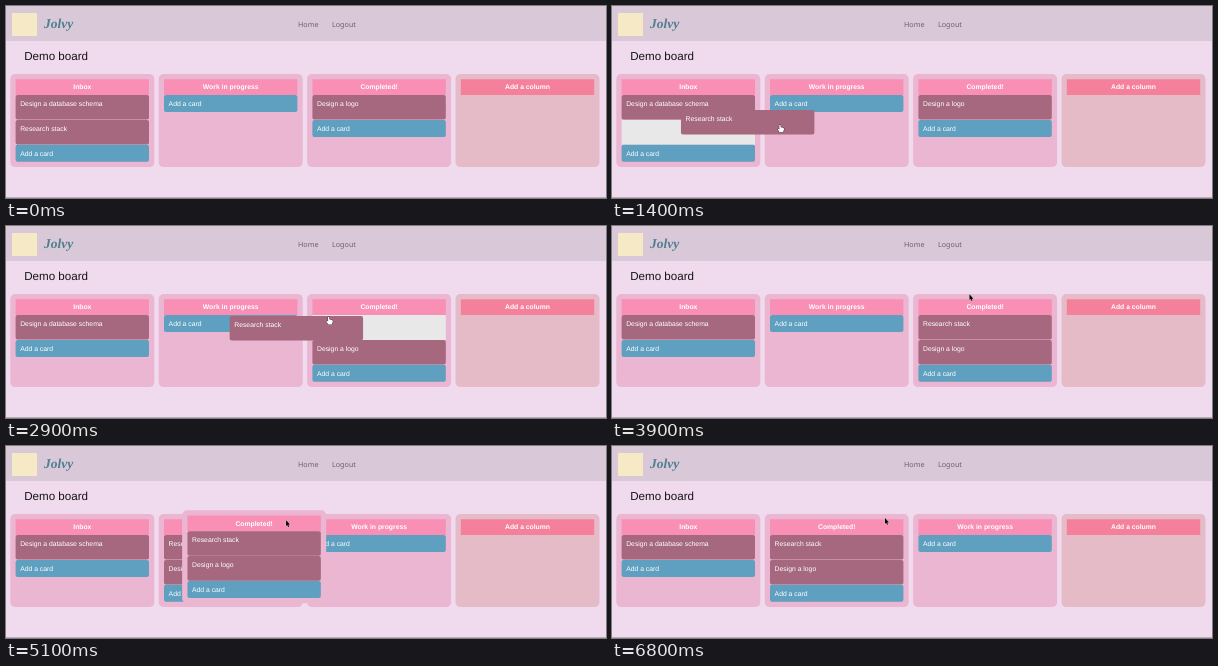
Recreate the animation shown at these times as an HTML page with a canvas. Size 600 by 192 pixels, loop 6.9 s.

```html
<!DOCTYPE html>
<html lang="en">
<head>
<meta charset="utf-8">
<title>Demo board</title>
<style>
  html, body { margin: 0; width: 600px; height: 192px; overflow: hidden; background: #f0daee; }
  canvas { display: block; }
</style>
</head>
<body>
<canvas id="stage" width="600" height="192"></canvas>
<script>
const ctx = document.getElementById('stage').getContext('2d');
ctx.textRendering = 'geometricPrecision';
const LOOP = 6900, STEP = 100;
const TOP = 68, ROW = 24.9, ADD = 17, PAD = 5.3, HEAD = 21, COL_W = 144, CARD_W = 133.4;
const SANS = '"Liberation Sans", Arial, sans-serif';
const NAV = '7.2px "Noto Sans", sans-serif';
const DESIGN = 'Design a database schema', RESEARCH = 'Research stack', LOGO = 'Design a logo';

const colX = i => 4.3 + 148.4 * i;
const point = (x, y) => ({ x, y });
const add = (a, b, k = 1) => point(a.x + b.x * k, a.y + b.y * k);
const mix = (a, b, k) => point(a.x + (b.x - a.x) * k, a.y + (b.y - a.y) * k);
const arc = k => Math.sin(Math.PI * k);
const cardSlot = (col, row) => point(colX(col) + PAD, TOP + HEAD + row * ROW);
const columnSlot = col => point(colX(col), TOP);

// grip: pointer inside the piece; lift: bend of the drag; bow: bend of the approach
const drags = [
  { from: 1200, to: 1700, a: cardSlot(0, 1), b: cardSlot(1, 0), grip: point(99.3, 15), lift: 0, bow: point(-10, -18), card: true },
  { from: 2400, to: 3530, a: cardSlot(1, 0), b: cardSlot(2, 0), grip: point(99.3, 1), lift: 1, bow: point(-15, -17), card: true },
  { from: 4300, to: 5250, a: columnSlot(2), b: columnSlot(1), grip: point(104, 10), lift: -8, bow: point(-48, -16) }
];
const ENTER = { to: 100, at: point(130, 170) };
const REST = { from: 5700, at: point(273, 72), bow: point(0, 0) };

const progress = (d, t) => (t - d.from) / (d.to - d.from);

function piece(d, t) {
  const k = progress(d, t);
  return add(mix(d.a, d.b, k), point(0, d.lift), arc(k));
}

// Where the pointer is while it carries nothing
function roam(t) {
  const i = drags.findIndex(d => t < d.from);
  const next = drags[i] || REST;
  const prev = i < 0 ? drags.at(-1) : drags[i - 1] || ENTER;
  const a = prev.at || add(prev.b, prev.grip);
  const b = next.at || add(next.a, next.grip);
  const k = Math.min(1, (t - prev.to) / (next.from - prev.to));
  return add(mix(a, b, k), next.bow, arc(k));
}

// A piece takes its new slot before the drag is halfway
function board(t) {
  const [toWork, toDone, swapped] = drags.map(d => progress(d, t) > 0.4);
  const inbox = { name: 'Inbox', cards: toWork ? [DESIGN] : [DESIGN, RESEARCH] };
  const work = { name: 'Work in progress', cards: toWork && !toDone ? [RESEARCH] : [] };
  const done = { name: 'Completed!', cards: toDone ? [RESEARCH, LOGO] : [LOGO] };
  return swapped ? [inbox, done, work] : [inbox, work, done];
}

function box(x, y, w, h, color, r = 0) {
  ctx.fillStyle = color;
  ctx.beginPath();
  ctx.roundRect(x, y, w, h, r);
  ctx.fill();
}

function text(str, x, y, color, font, align = 'left') {
  ctx.fillStyle = color;
  ctx.font = font;
  ctx.textAlign = align;
  ctx.fillText(str, x, y);
}

function strip(str, x, y, h, color) {
  box(x, y, CARD_W, h, color, 2);
  text(str, x + 4.6, y + 11, '#fff', '6.8px ' + SANS);
}

const card = (str, x, y) => strip(str, x, y, ROW - 0.3, '#a5687f');

function column(col, x, y, h, hideResearch) {
  const last = !col.cards;
  const left = x + PAD;
  box(x, y, COL_W, h, last ? '#e5bbc8' : '#ebb6d1', 5);
  box(left, y + 5.2, CARD_W, HEAD - 5.2, last ? '#f5809b' : '#f98fb5');
  text(col.name, left + CARD_W / 2, y + 15.4, '#fff', 'bold 6.8px ' + SANS, 'center');
  if (last) return;
  let row = y + HEAD;
  for (const name of col.cards) {
    if (hideResearch && name === RESEARCH) box(left, row, CARD_W, ROW, '#e8e8e8');
    else card(name, left, row);
    row += ROW;
  }
  strip('Add a card', left, row, ADD, '#5f9fbf');
}

function shape(d, fill, line) {
  const outline = new Path2D(d);
  ctx.lineWidth = 0.7;
  ctx.strokeStyle = line;
  ctx.fillStyle = fill;
  ctx.stroke(outline);
  ctx.fill(outline);
}

function drawPointer({ x, y }, kind) {
  ctx.save();
  ctx.translate(x, y);
  if (kind === 'beam') shape('M-1.2-3.6h2.4M0-3.6v7M-1.2 3.4h2.4', '#333', '#333');
  else if (kind === 'hand') shape('M-1 0h1.2l.3 2.4 2.9.6.4 1.4-1 3h-3.4l-2-3 .8-.6 1 .8z', '#fff', '#222');
  else shape('M0 0v5.8l1.2-1.1.9 2 .9-.4-.9-1.9h1.8z', '#000', '#ccc');
  ctx.restore();
}

const overTitle = p => p.y > 76 && p.y < 86 &&
  [0, 1, 2].some(i => Math.abs(p.x - colX(i) - COL_W / 2) < 28);

function draw(t) {
  box(0, 0, 600, 192, '#f0daee');
  box(0, 0, 600, 35, '#d8c8d8');
  box(0, 191, 600, 1, '#b9abb9');
  box(6, 7, 25, 23, '#f5e9c6');
  text('Jolvy', 38, 21.5, '#4f7f8e', 'italic bold 13.5px "Liberation Serif", serif');
  text('Home', 292, 21.3, '#6b6270', NAV);
  text('Logout', 326, 21.3, '#6b6270', NAV);
  text('Demo board', 18.2, 53.8, '#151515', '11.6px ' + SANS);

  const cols = board(t);
  const rows = Math.max(...cols.map(c => c.cards.length));
  const height = HEAD + rows * ROW + ADD + PAD;
  const drag = drags.find(d => t >= d.from && t < d.to);
  const carriesCard = drag && drag.card;
  [...cols, { name: 'Add a column' }].forEach((col, i) =>
    column(col, colX(i), TOP, height, carriesCard));

  if (t < ENTER.to) return;
  if (!drag) {
    const at = roam(t);
    drawPointer(at, overTitle(at) ? 'beam' : 'arrow');
    return;
  }
  const at = piece(drag, t);
  if (carriesCard) card(RESEARCH, at.x, at.y);
  else column(cols.find(c => c.name === 'Completed!'), at.x, at.y, height);
  drawPointer(add(at, drag.grip), carriesCard ? 'hand' : 'arrow');
}

const start = performance.now();
function frame() {
  const t = (performance.now() - start) % LOOP;
  draw(Math.floor(t / STEP) * STEP);
  requestAnimationFrame(frame);
}
frame();
</script>
</body>
</html>
```
